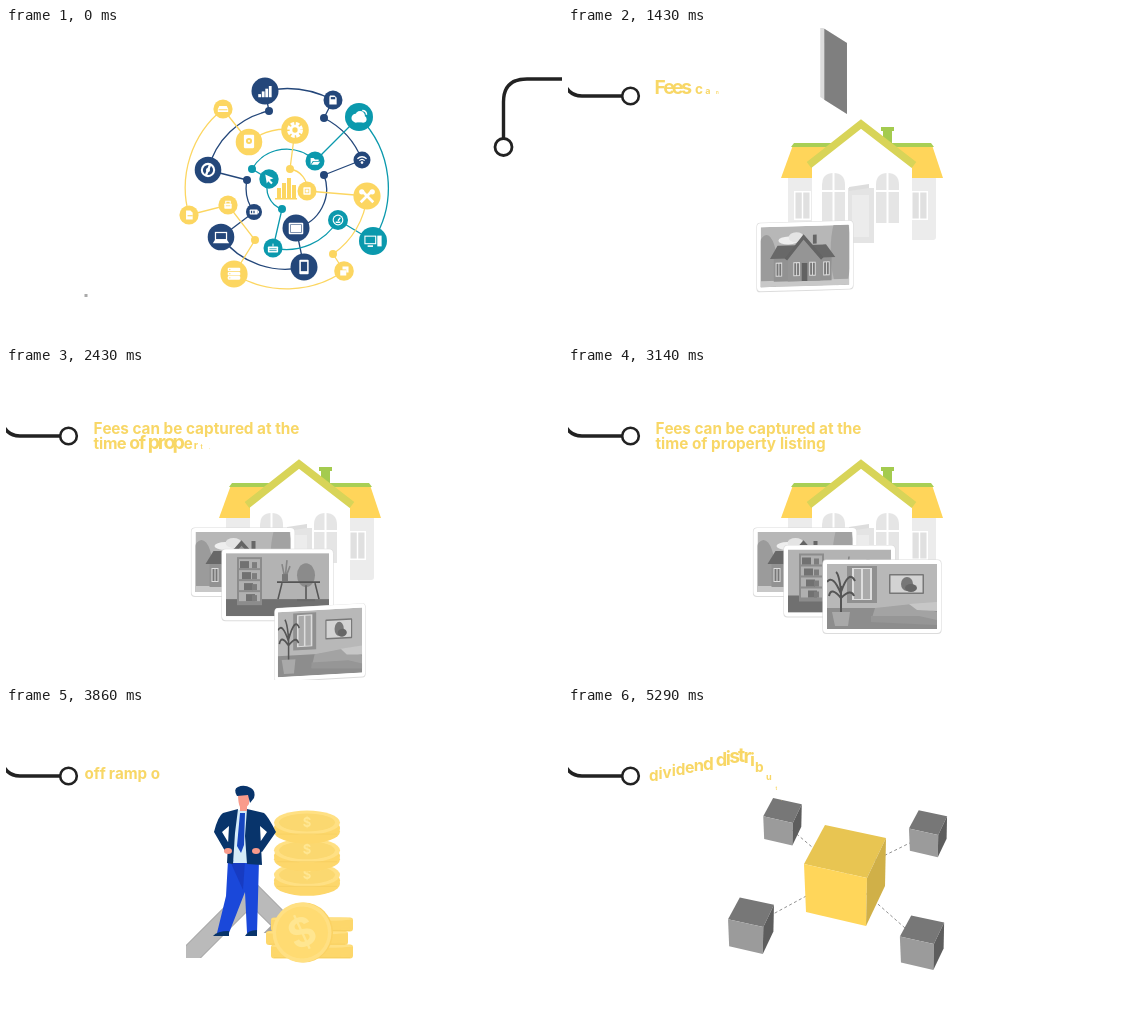
These frames come from a looping animation (556 by 312 pixels, 5440 ms). An HTML page:

```html
<!DOCTYPE html>
<html lang="en">
<head>
<meta charset="utf-8">
<title>Property finance loop</title>
<style>
html,body{margin:0;width:100%;height:100%;overflow:hidden;background:#fff}
svg{display:block;width:100vw;height:100vh}
text{font-family:Inter,"Open Sans",sans-serif;font-weight:700}
</style>
</head>
<body>
<svg id="stage" viewBox="0 0 556 312"></svg>
<script>
const NS = 'http://www.w3.org/2000/svg';
const stage = document.getElementById('stage');
const LOOP = 5440, STEP = 1000 / 7, PAN = 650;
const NAVY = '#24477a', TEAL = '#0b99ad', GOLD = '#fcd661', INK = '#222';

const clamp = v => Math.max(0, Math.min(1, v));
const span = (t, a, b) => clamp((t - a) / (b - a));
const mix = (a, b, p) => a + (b - a) * p;
const easeOut = p => 1 - (1 - p) ** 3;
const easeBoth = p => p < .5 ? 4 * p ** 3 : 1 - (2 - 2 * p) ** 3 / 2;

function group(parent, markup = '') {
  const g = document.createElementNS(NS, 'g');
  g.innerHTML = markup;
  parent.appendChild(g);
  return g;
}
const move = (g, x, y, more = '') => g.setAttribute('transform', `translate(${x} ${y}) ${more}`);
const show = (g, on) => g.setAttribute('display', on ? 'inline' : 'none');
const rect = (x, y, w, h, fill, r = 0) => `<rect x="${x}" y="${y}" width="${w}" height="${h}" rx="${r}" fill="${fill}"/>`;
const disc = (x, y, r, fill) => `<circle cx="${x}" cy="${y}" r="${r}" fill="${fill}"/>`;
const oval = (x, y, rx, ry, fill) => `<ellipse cx="${x}" cy="${y}" rx="${rx}" ry="${ry}" fill="${fill}"/>`;
const poly = (pts, fill) => `<polygon points="${pts}" fill="${fill}"/>`;
const shape = (d, fill) => `<path d="${d}" fill="${fill}"/>`;
const line = (d, stroke, w = 1.3) => `<path d="${d}" fill="none" stroke="${stroke}" stroke-width="${w}"/>`;

// Network: icons fit a unit of about 14 px around the node centre.
const W = '#fff';
const icons = {
  bars: () => [0, 1, 2, 3].map(i => rect(-6.5 + i * 3.4, 3 - i * 2.6, 2.7, 3 + i * 2.6, W)).join(''),
  sd: c => shape('M-4-6H2L5-3V6H-5V-4Z', W) + rect(-3, -4, 6, 3, c),
  gauge: c => disc(0, 0, 7, W) + disc(0, 0, 5, c) + line('M-2 5L2-5', W, 2.4) + disc(0, 0, 2, W),
  wifi: () => line('M-7-2Q0-8 7-2M-4 1Q0-3 4 1', W, 2) + disc(0, 4, 2, W),
  battery: c => rect(-7, -4, 13, 8, W, 1) + rect(6, -2, 2, 4, W) + line('M-4-2V2M0-2V2', c, 2),
  tablet: c => rect(-7, -5, 14, 11, W, 1) + rect(-5.5, -3.5, 11, 8, c) + rect(-5, -3, 10, 7, W),
  laptop: c => rect(-6, -5, 12, 8, W) + rect(-4.8, -3.8, 9.6, 5.8, c) + poly('-6,3 6,3 8,6 -8,6', W),
  phone: c => rect(-4.5, -7, 9, 14, W, 1) + rect(-3, -5, 6, 9, c),
  cloud: () => disc(-3, 1, 4, W) + disc(1, -1, 4.5, W) + disc(4, 2, 3, W) + rect(-4, 1, 9, 4, W) + line('M3-6Q7-6 7-2', W),
  folder: () => shape('M-6-4H-2L0-2H5V0H-3L-6 5ZM-2 1H7L4 5H-5Z', W),
  cursor: () => poly('-5,-6 6,-1 1,1 5,5 3,7 -1,3 -3,6', W),
  dial: c => disc(0, 0, 7, W) + disc(0, 0, 5.5, c) + line('M-3 3H3M0 1L3-3', W, 1.8),
  pc: c => rect(-8, -5, 11, 8, W) + rect(-7, -4, 9, 6, c) + rect(-5, 4, 5, 1.5, W) + rect(4, -5, 4, 10, W),
  keys: c => rect(-7, -2, 14, 8, W, 1) + line('M-5 1H5M-5 3.5H5', c, 1) + line('M0-2V-6', W),
  drive: c => shape('M-5-4H5L7 0V4H-7V0Z', W) + line('M-6 1H6', c),
  disk: c => rect(-5, -7, 10, 13, W, 1) + disc(0, -1, 3, c) + disc(0, -1, 1, W),
  gear: c => `<circle r="5.5" fill="none" stroke="${W}" stroke-width="4" stroke-dasharray="3 1.32"/>` + disc(0, 0, 5, W) + disc(0, 0, 2.5, c),
  chip: c => rect(-5, -5, 10, 10, W, 1) + rect(-3, -3, 6, 6, c) + rect(-2, -2, 4, 4, W),
  tools: () => line('M-5-5L6 6M5-5L-6 6', W, 2.6) + disc(-5, -4, 2.5, W) + disc(5, -4, 2.5, W),
  lock: c => rect(-5, -2, 10, 7, W, 1) + line('M-3-2V-5H3V-2', W, 1.5) + line('M-3 1H3', c, 1),
  doc: c => shape('M-4-6H2L5-3V6H-4Z', W) + line('M-2 1H5', c, 1.5),
  server: c => [-6, -2, 2].map(y => rect(-6, y, 12, 3.4, W, 1) + disc(-4, y + 1.7, .6, c)).join(''),
  cards: c => rect(-2, -6, 8, 8, W) + rect(-6, -2, 9, 8, c) + rect(-5, -1, 8, 7, W)
};

function network() {
  const hub = [
    [NAVY, {
      arcs: 'M259 63A100 100 0 0 1 327 72M202 142A80 80 0 0 1 263 83M318 90A80 80 0 0 1 356 132M298 239A80 80 0 0 1 215 209M248 184A40 40 0 0 1 241 152M318 147A40 40 0 0 1 290 200',
      links: 'M259 63L263 83M327 72L318 90M356 132L318 147M202 142L241 152M290 200L298 239M248 184L215 209',
      dots: [[263, 83], [318, 90], [318, 147], [241, 152]],
      nodes: [[259, 63, 13.5, 'bars'], [327, 72, 9.5, 'sd'], [202, 142, 13.3, 'gauge'], [356, 132, 8.5, 'wifi'],
        [248, 184, 8, 'battery'], [290, 200, 13.5, 'tablet'], [215, 209, 13.3, 'laptop'], [298, 239, 13.5, 'phone']]
    }],
    [TEAL, {
      arcs: 'M353 89A100 100 0 0 1 367 213M246 141A40 40 0 0 1 309 133M332 192A60 60 0 0 1 267 220M276 181A22 22 0 0 1 263 151',
      links: 'M353 89L309 133M263 151L246 141M276 181L267 220M332 192L367 213',
      dots: [[246, 141], [276, 181]],
      nodes: [[353, 89, 14, 'cloud'], [309, 133, 9.5, 'folder'], [263, 151, 9.7, 'cursor'], [332, 192, 10, 'dial'],
        [367, 213, 14, 'pc'], [267, 220, 9.5, 'keys']]
    }],
    [GOLD, {
      arcs: 'M183 187A101 101 0 0 1 217 81M338 243A101 101 0 0 1 228 246M361 168A80 80 0 0 1 327 226M243 114A60 60 0 0 1 289 102M284 141A20 20 0 0 1 301 163',
      links: 'M217 81L243 114M289 102L284 141M183 187L222 177L249 212L228 246M361 168L301 163M338 243L327 226',
      dots: [[284, 141], [249, 212], [327, 226]],
      nodes: [[217, 81, 9.6, 'drive'], [243, 114, 13.3, 'disk'], [289, 102, 13.8, 'gear'], [301, 163, 9.5, 'chip'],
        [361, 168, 13.6, 'tools'], [222, 177, 9.6, 'lock'], [183, 187, 9.6, 'doc'], [228, 246, 13.6, 'server'], [338, 243, 9.8, 'cards']]
    }]
  ];
  const bars = [10, 15, 20, 13].map((h, i) => rect(271 + i * 5, 170 - h, 4, h, GOLD)).join('') + rect(269, 170, 22, 1.5, GOLD);
  return hub.map(([c, n]) => line(n.arcs + n.links, c)).join('') + bars +
    hub.map(([c, n]) => n.dots.map(([x, y]) => disc(x, y, 4, c)).join('') +
      n.nodes.map(([x, y, r, icon]) => disc(x, y, r, c) +
        `<g transform="translate(${x} ${y}) scale(${r / 13})">${icons[icon](c)}</g>`).join('')).join('') +
    rect(78.5, 266, 3, 3, '#aaa');
}

function house() {
  const arch = x => shape(`M${x} 195V157Q${x} 145 ${x + 11.5} 145T${x + 23} 157V195Z`, '#e5e5e5') +
    line(`M${x + 11.5} 145V195M${x} 163H${x + 23}`, W, 2);
  const sash = x => rect(x, 163, 17, 29, W) + rect(x + 1.5, 164.5, 14, 26, '#e0e0e0') + line(`M${x + 8.5} 163V192`, W, 1.5);
  return rect(220, 148, 26, 62, '#ececec') + rect(342, 148, 26, 64, '#ececec', 3) +
    poly('225,117 276,117 246,150 213,150', '#ffd55a') + poly('310,117 364,117 375,150 342,150', '#ffd55a') +
    poly('226,115 277,115 272,119 223,119', '#a9cf55') + poly('310,115 363,115 366,119 315,119', '#a9cf55') +
    rect(315, 102, 9, 15, '#a4cb4f') + rect(313, 99, 13, 4, '#a4cb4f') +
    poly('293,97 344,137 344,212 244,212 244,137', W) +
    arch(254) + arch(308) + rect(280, 160, 26, 55, '#e4e4e4') + poly('281,159 301,156 301,160 281,163', '#ddd') +
    rect(284, 167, 17, 42, '#ececec') + sash(226) + sash(343) +
    line('M241 137L293 96L346 137', '#d8d458', 7.5);
}

const frame = (w, h, art) => rect(-w / 2 - .6, -h / 2 - .4, w + 1.2, h + 1.4, '#dcdcdc', 4) +
  rect(-w / 2, -h / 2, w, h, W, 4) + `<svg x="${-w / 2 + 4}" y="${-h / 2 + 4}" width="${w - 8}" height="${h - 8}">${art}</svg>`;

const villa = rect(0, 0, 95, 60, '#b7b7b7') + oval(6, 42, 12, 34, '#9b9b9b') + oval(86, 26, 11, 38, '#a2a2a2') +
  oval(30, 14, 11, 4, '#eee') + oval(38, 11, 8, 5, '#e4e4e4') + rect(0, 54, 95, 8, '#c8c8c8') +
  rect(14, 30, 62, 25, '#929292') + poly('18,19 70,19 80,32 10,32', '#686868') +
  rect(56, 9, 4, 9, '#666') + poly('29,31 46,11 64,31 64,55 29,55', '#959595') + line('M27 33L46 11L66 33', '#646464', 3.5) +
  [16, 35, 52, 67].map(x => rect(x, 36, 7, 14, '#ddd') + rect(x + 1, 37, 2, 12, '#777') + rect(x + 4, 37, 2, 12, '#777')).join('') +
  rect(44, 37, 6, 18, '#626262');
const study = rect(0, 0, 103, 63, '#b3b3b3') + rect(0, 46, 103, 17, '#707070') + rect(11, 4, 25, 48, '#8c8c8c') +
  [0, 1, 2, 3].map(i => rect(13, 6 + i * 11, 21, 9, '#b0b0b0') + rect(14 + i * 2, 8 + i * 11, 9, 7, '#717171') + rect(26, 9 + i * 11, 5, 6, '#7d7d7d')).join('') +
  oval(80, 22, 9, 12, '#8b8b8b') + line('M80 32V47M71 47H89', '#696969', 2) +
  line('M51 29H94M56 30L52 46M89 30L93 46', '#555', 1.6) + line('M59 26L56 11M59 26L61 7M59 26L64 13', '#858585', 1.6) + rect(56, 21, 6, 7, '#777');
const bedroom = rect(0, 0, 110, 65, '#b8b8b8') + rect(0, 44, 110, 21, '#8d8d8d') +
  rect(20, 2, 30, 37, '#909090') + rect(25, 4, 20, 32, '#ddd') + rect(27, 5, 7, 30, '#aaa') + rect(36, 5, 7, 30, '#aaa') +
  rect(62, 10, 35, 20, '#777', 1) + rect(63.5, 11.5, 32, 17, '#d3d3d3') + oval(80, 20, 6, 7, '#777') + oval(84, 24, 6, 4, '#666') +
  poly('48,44 85,40 110,48 110,60 44,57', '#a3a3a3') + poly('82,40 110,38 110,47 90,46', '#c7c7c7') + poly('44,52 92,52 110,56 110,61 44,58', '#969696') +
  line('M14 52V22M14 30Q6 10 0 18M14 28Q22 5 28 17M14 34Q4 22 2 32M14 34Q24 24 27 32M14 27Q12 10 9 8', '#555', 2) + poly('5,48 23,48 21,62 8,62', '#a9a9a9');

function connectorStart() {
  return line('M497.500 110V74Q497.500 51 521 51H606Q644 51 644 54Q644 68 664 68H703', INK, 3.4) +
    `<circle cx="497.500" cy="119" r="8.500" fill="#fff" stroke="${INK}" stroke-width="2.800"/>`;
}
const connectorEnd = line('M-6 40V48Q-2 68 14 68H54', INK, 3.4) +
  `<circle cx="62.500" cy="68" r="8.300" fill="#fff" stroke="${INK}" stroke-width="2.600"/>`;

function man() {
  const skin = '#f99b8b', suit = '#08346b', blue = '#1a48da';
  return poly('222,152 253,152 252,190 251,225 241,225 239,184 223,225 211,225 220,188', blue) + poly('224,153 239,153 237,182', '#173bc2') +
    shape('M207 228Q211 223 223 223V228ZM239 228Q242 222 251 222V228Z', suit) +
    poly('230,102 243,102 243,155 227,155', '#d5ecf8') + poly('234,105 239,105 238,137 235,145 231,138', '#1746c0') +
    shape('M232 101L217 105Q212 108 208 124L219 143L225 139L216 124L223 118L221 155L227 156L229 125Z', suit) +
    shape('M241 101L258 105Q262 108 270 124L256 144L250 140L261 124L254 118L256 157L241 156L239 128Z', suit) +
    oval(222, 143, 4, 3, skin) + oval(250, 143, 4, 3, skin) + rect(234, 94, 7, 9, skin) + shape('M232 85H243V96Q239 102 234 99Q232 95 232 85Z', skin) +
    shape('M231 88Q227 81 232 79Q238 76 245 80Q250 83 248 90L244 95L242 87Z', suit);
}

// A line of letters that pop in one after another, optionally riding a wave.
const pen = document.createElement('canvas').getContext('2d');
function lettering(parent, words, x, y, size, start, style) {
  pen.font = `700 ${size}px Inter,"Open Sans",sans-serif`;
  const letters = [...words].map((ch, i) => {
    const left = pen.measureText(words.slice(0, i)).width;
    const g = group(parent, `<text text-anchor="middle" font-size="${size}" fill="#f8d766">${ch}</text>`);
    return { g, x: x + left + pen.measureText(ch).width / 2, at: start + i * 30 };
  });
  return t => letters.forEach(({ g, x, at }) => {
    const age = t - at;
    show(g, age >= 0);
    if (age < 0) return;
    const pop = age < 130 ? age / 100 : mix(1.3, 1, span(age, 200, 430));
    const lift = age < 170 ? mix(20, -19, Math.sin(age / 170 * Math.PI / 2)) : -19 * (1 - span(age, 190, 540));
    move(g, x, y + (style === 'wave' ? lift : 0), style === 'plain' ? '' : `scale(${Math.max(.1, pop)})`);
  });
}

const cube = (x, y, k, top, front, side) => `<g transform="translate(${x} ${y}) scale(${k})">` +
  poly('-20,-51 41,-38 22,2 -41,-12', top) + poly('-41,-12 22,2 21,50 -39,36', front) + poly('41,-38 22,2 21,50 40,10', side) + '</g>';

// Scene layers
const net = group(stage, network());
const start = group(stage, connectorStart());
const listing = group(stage);
const home = group(listing, house());
const cards = [[237, 194, 103, 68, villa, 730], [271.5, 213, 111, 71, study, 1300], [314, 228.500, 118, 73, bedroom, 1900]]
  .map(([x, y, w, h, art, at]) => {
    const g = group(listing);
    return { x, y, at, g, face: group(g, frame(w, h, art)), back: group(g, rect(-w / 2, -h / 2, w, h, '#dcdcdc') + rect(-w / 2 + 17, -h / 2, w - 17, h, '#7f7f7f')) };
  });
const fees = [lettering(listing, 'Fees can be captured at the', 87.500, 66, 15.3, 1190),
  lettering(listing, 'time of property listing', 87.500, 81, 15.3, 1970)];

const capital = group(stage);
const trend = group(capital);
const note = group(capital, shape('M258 133L281 139Q298 150 302 172H258Z', '#1d46cd') + line('M259 138L279 143Q293 152 297 170', '#6f90f4', 1) + disc(277, 171, 9, '#5d86ee'));
const bag = group(capital, rect(302, 157, 26, 14, '#fbac58', 2) + line('M311 157V154H319V157', '#ee9c45', 1.2));
const pile = group(capital);
const person = group(capital, man());
const bigCoin = group(capital);
const ramp = lettering(capital, 'off ramp of capital', 78.500, 71, 15.2, 3565, 'plain');

const cubes = group(stage);
const dividend = lettering(stage, 'dividend distribution', 81, 73, 15.1, 4745, 'wave');
const end = group(stage, connectorEnd);

function drawCards(t) {
  for (const c of cards) {
    const s = t - c.at, angle = 130 * (1 - clamp(s / 1100)) ** 1.8;
    show(c.g, s > 0);
    show(c.back, angle > 90);
    show(c.face, angle <= 90);
    const dy = s < 400 ? mix(-278, 55, s / 400) : 55 * (1 - span(s, 400, 1180));
    const turn = clamp((angle - 50) / 55);
    const skew = turn > 0 ? 33 * turn : -angle * .08;
    const squash = Math.max(.04, Math.abs(Math.cos(angle * Math.PI / 180)));
    move(c.g, c.x - 6 * turn, c.y + dy, `skewY(${skew}) scale(${squash} 1)`);
  }
}

function drawTrend(t) {
  const pts = [[174, 257], [246, 185], [294, 233], [419, 106]];
  let left = mix(0, 350, span(t, 3571, 4290)), d = 'M174 257', x = 174, y = 257, turn = 0;
  for (let i = 1; i < pts.length && left > 0; i++) {
    const [ax, ay] = pts[i - 1], dx = pts[i][0] - ax, dy = pts[i][1] - ay, len = Math.hypot(dx, dy), p = Math.min(1, left / len);
    x = ax + dx * p; y = ay + dy * p; d += `L${x} ${y}`;
    turn = Math.atan2(dy, dx) * 180 / Math.PI;
    left -= len;
  }
  trend.innerHTML = line(d, '#a9a9a9', 20) + line(d, '#bababa', 18) +
    `<g transform="translate(${x} ${y}) rotate(${turn})">${poly('-1,-20 20,0 -1,20', '#a4a4a4')}${poly('-1,-10 9,-10 20,0 9,10 -1,10', '#b6b6b6')}</g>` +
    rect(160, 250, 60, 25, W) + rect(160, 225, 20, 30, W);
}

function drawCoins(t) {
  let art = '';
  for (let i = 0; i < 6; i++) {
    const off = -1.1 * Math.max(0, [3690, 3740, 3790, 3885, 3895, 3908][i] - t);
    const tilt = clamp(-off / 25), rx = mix(41, 33, tilt), ry = mix(2, 12, tilt);
    const x = 306 - 5 * tilt + (i % 2 ? -5 : 0) * (1 - tilt), y = 243 - i * 13.5 + off;
    art += rect(x - rx, y - 6.5, rx * 2, 14, '#fdd76b', mix(3, 12, tilt)) + oval(x, y + 4, rx, ry, '#fdd76b') + oval(x, y - 5, rx, ry, '#ffe083');
    art += line(`M${x - rx + 3} ${y + 6.5}H${x + rx - 3}`, '#f6ce60', .8);
    if (tilt > .5) art += oval(x, y - 5, rx - 5, ry - 3, '#fbd870') + `<text x="${x}" y="${y - 1}" text-anchor="middle" font-size="13" fill="#ffe793">$</text>`;
  }
  pile.innerHTML = art;
  const p = span(t, 3860, 4290), k = easeOut(span(t, 3560, 3800));
  bigCoin.innerHTML = oval(1.5, 0, 29.5, mix(30, 38.5, p), '#fbd263') + oval(0, 0, 29.5, mix(30, 38.5, p), '#ffe083') +
    oval(0, 0, 26, mix(26, 34.5, p), '#ffdb72') + `<text transform="rotate(-25) scale(1 ${mix(1, 1.2, p)})" y="14" text-anchor="middle" font-size="40" fill="#ffe691">$</text>`;
  move(bigCoin, mix(296, 281, p), mix(224.500, 217.500, p), `scale(${Math.max(.01, k)})`);
}

function drawCapital(t) {
  move(capital, t > 4430 ? 100 * ((t - 4430) / 141) ** 2 : 0, 0);
  const rise = t < 3860 ? 260 * (1 - easeOut(span(t, 3500, 3850))) : 22 * easeBoth(span(t, 3860, 4290));
  move(person, 0, rise);
  drawTrend(t);
  drawCoins(t);
  const noteIn = easeOut(span(t, 4000, 4350));
  show(note, noteIn > 0);
  move(note, 0, 45 * (1 - noteIn));
  const bagIn = span(t, 4000, 4280);
  show(bag, bagIn > 0);
  move(bag, 0, -180 * (1 - bagIn ** 2));
  ramp(t);
}

function drawCubes(t) {
  const grow = easeOut(span(t, 4720, 5050)), fly = easeOut(span(t, 4850, 5270));
  const ends = [[214.5, 114, .47], [360, 126, .465], [183, 218, .56], [354, 235, .54]]
    .map(([x, y, k]) => [mix(277, x, fly), mix(167, y, fly), k * fly]);
  cubes.innerHTML = ends.map(([x, y]) => `<path d="M277 167L${x} ${y}" stroke="#929292" stroke-dasharray="3 2.500"/>`).join('') +
    ends.map(e => cube(...e, '#777', '#9b9b9b', '#5d5d5d')).join('') + cube(277, 168, grow, '#e8c552', '#ffd65a', '#d0b048');
}

function draw(t) {
  const pan = easeBoth(span(t, 0, 1140));
  show(net, t < 1140);
  show(start, t < 1140);
  move(net, -PAN * pan, 0);
  move(start, -PAN * pan, 0);
  move(end, PAN * (1 - pan), 0);

  show(listing, t < 3425);
  move(listing, -420 * span(t, 3145, 3425) ** 1.5, 0);
  move(home, PAN * (1 - pan), 0);
  drawCards(t);
  fees.forEach(f => f(t));

  const third = t > 3500 && t < 4850;
  show(capital, third);
  if (third) drawCapital(t);
  show(cubes, t > 4750);
  if (t > 4750) drawCubes(t);
  dividend(t);
}

// The picture holds for one seventh of a second at a time.
let last = -1;
function tick(now) {
  const k = Math.min(37, Math.floor((now % LOOP + 4) / STEP));
  if (k !== last) draw((last = k) * STEP);
  requestAnimationFrame(tick);
}
draw(0);
requestAnimationFrame(tick);
</script>
</body>
</html>
```
